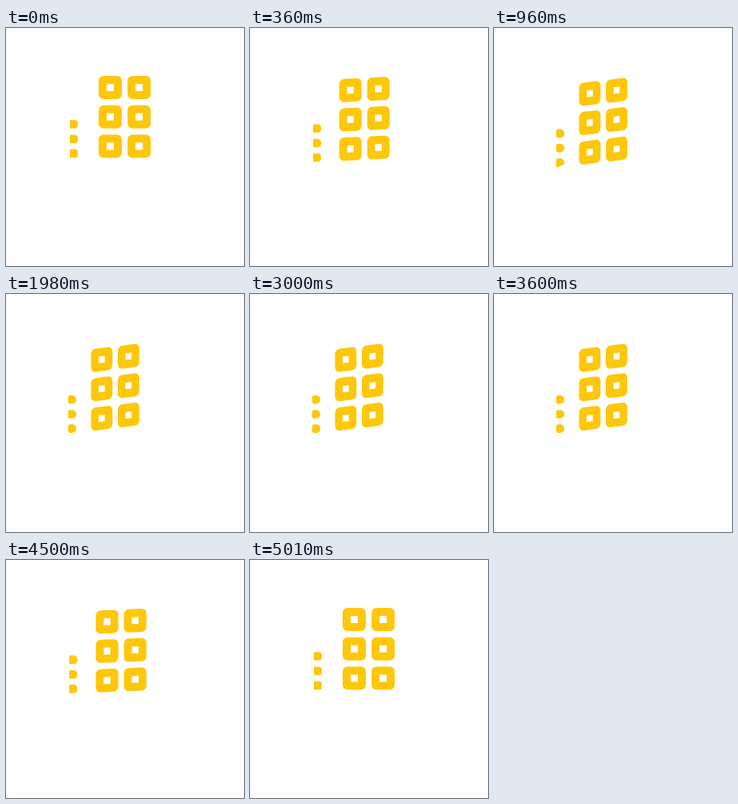
Animation, 298 px wide and 298 px high, one loop 5.82 s. Source, as an HTML page with a canvas:

```html
<!DOCTYPE html>
<html lang="en">
<head>
<meta charset="utf-8">
<title>Building windows</title>
<style>
  html, body { margin: 0; width: 100%; height: 100%; overflow: hidden; background: #fff; }
  canvas { display: block; }
</style>
</head>
<body>
<canvas id="stage" width="298" height="298"></canvas>
<script>
const ctx = document.getElementById('stage').getContext('2d');
const LOOP = 5820, STEP = 30;
const mix = (a, b, k) => a + (b - a) * k;

// Progress of a cubic-bezier(x1, 0, x2, 1) easing.
function ease(x1, x2, x) {
  if (x <= 0) return 0;
  if (x >= 1) return 1;
  let low = 0, high = 1, s = 0.5;
  for (let i = 0; i < 24; i++) {
    s = (low + high) / 2;
    const u = 1 - s;
    if (3 * u * u * s * x1 + 3 * u * s * s * x2 + s ** 3 < x) low = s;
    else high = s;
  }
  return s * s * (3 - 2 * s);
}

// Front facade: a 2 x 3 grid, compressed and sheared as the building turns.
function drawFront(turn) {
  ctx.save();
  ctx.transform(mix(1, 0.927, turn), mix(0, -0.111, turn), 0, 1,
                mix(0, -1.1, turn), mix(0, 22, turn));
  const hole = mix(9, 8.2, turn);
  for (const x of [130.5, 166.7]) {
    for (const y of [74.5, 111.2, 148]) {
      ctx.beginPath();
      ctx.roundRect(x - 14.5, y - 14.5, 29, 29, 6);
      ctx.rect(x - hole / 2, y - hole / 2, hole, hole);
      ctx.fill('evenodd');
    }
  }
  ctx.restore();
}

// Side window; tail stretches its lower left corner into a point.
function drawSide(y, turn, tail) {
  const left = mix(80, 77.8, turn), right = mix(90, 88.1, turn);
  const top = y - 5.3, bottom = y + 5.3;
  const round = mix(4, 5.1, turn), corner = 2.4 * turn;
  ctx.beginPath();
  ctx.moveTo(left, y);
  ctx.arcTo(left, top, right, top, corner);
  ctx.arcTo(right, top, right, y, round);
  ctx.lineTo(right, y);
  ctx.arcTo(right, bottom - 3 * tail, left, bottom + tail, mix(round, 2.5, tail));
  ctx.arcTo(left, bottom + tail, left, y, corner * (1 - tail));
  ctx.closePath();
  ctx.fill();
}

function draw(now) {
  const t = Math.floor(now % LOOP / STEP) * STEP;
  const turn = t < 3570 ? ease(0.4, 0.2, t / 1090)
                        : 1 - ease(0.6, 0.6, (t - 3570) / 1460);
  const tail = t < 1170 ? Math.max(0, turn * 2 - 1)
                        : 1 - ease(0.4, 0.2, (t - 1170) / 900);

  ctx.fillStyle = '#fff';
  ctx.fillRect(0, 0, 298, 298);
  ctx.fillStyle = '#fdc70c';
  drawFront(turn);
  drawSide(mix(120.5, 132.2, turn), turn, 0);
  drawSide(mix(139, 150.5, turn), turn, 0);
  drawSide(mix(157.1, 168.6, turn), turn, tail);
  requestAnimationFrame(draw);
}

draw(0);
</script>
</body>
</html>
```
